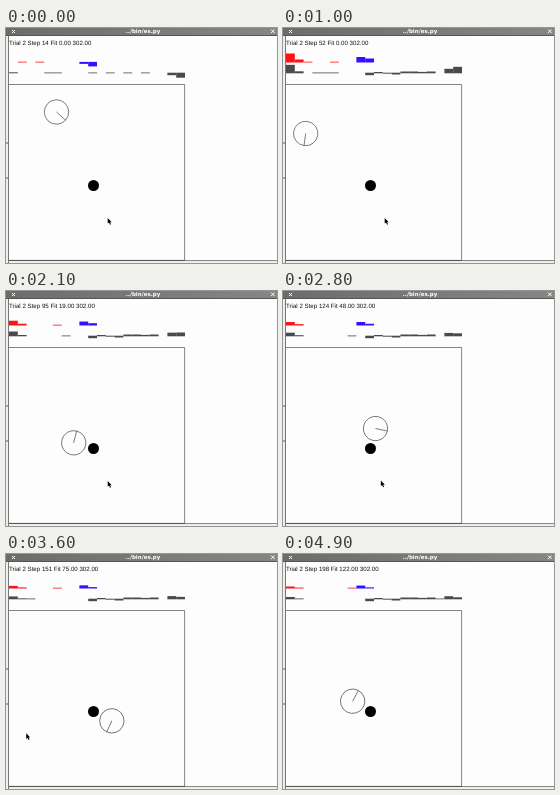
An HTML page that plays this animation: 271 by 235 pixels, repeating every 5 s.

```html
<!DOCTYPE html>
<html lang="en">
<head>
<meta charset="utf-8">
<title>Robot trial</title>
<style>
  html, body { margin: 0; width: 100%; height: 100%; overflow: hidden; background: #fdfdfd; }
  svg { display: block; width: 100vw; height: 100vh; }
  text { text-rendering: geometricPrecision; white-space: pre; }
  .title { font: bold 5.5px "DejaVu Sans", sans-serif; fill: #fff; }
  .status { font: 6.15px "Liberation Sans", Arial, sans-serif; fill: #111; }
  .line { fill: none; stroke: #222; stroke-width: .55; }
</style>
</head>
<body>
<svg viewBox="0 0 271 235">
  <defs>
    <linearGradient id="bar">
      <stop offset="0" stop-color="#6c6c6a"/>
      <stop offset="1" stop-color="#868684"/>
    </linearGradient>
  </defs>
  <rect width="271" height="235" fill="#fdfdfd"/>
  <rect y="8" width="2" height="227" fill="#eee"/>
  <path d="M0 115h2M0 150h2" stroke="#555"/>
  <rect x="2" y="8" width="1" height="227" fill="#777"/>
  <rect width="271" height="8" fill="url(#bar)"/>
  <rect y="7" width="271" height="1" fill="#555"/>
  <text class="title" x="137" y="5.3" text-anchor="middle">../bin/es.py</text>
  <path d="M6 2l3 3m0-3l-3 3M265 1.5l3.6 3.6m0-3.6l-3.6 3.6" stroke="#fff" fill="none"/>
  <rect x="3" y="233" width="268" height="2" fill="#eee"/>
  <rect x="3" y="232" width="268" height="1" fill="#888"/>
  <text class="status" id="status" x="3" y="17.3"></text>
  <g id="bars"></g>
  <path class="line" d="M3 56.5H178.6V232.4H3"/>
  <circle cx="87.5" cy="157.5" r="5.5"/>
  <g id="robot">
    <circle class="line" r="12.2"/>
    <path class="line" d="M0 0H12.2"/>
  </g>
  <path id="cursor" d="M0 0V5.6L1.3 4.5L2.3 6.8L3.3 6.3L2.3 4.2H4Z"/>
</svg>
<script>
const LOOP = 5000, TICK = 100;
const BAR_W = 8.8, BAR_X = 3, THIN = .8;
const DOT = { x: 87.5, y: 157.5 };
const ORBIT_START = 2100, ORBIT_R = 20.6, TANGENT = 88;

// time, step
const steps = [[0, 14], [1000, 52], [2100, 95], [2800, 124], [3600, 151], [4100, 169], [4900, 198]];

// time, x, y, heading
const approach = [
  [0, 50.5, 84, 42], [200, 58, 82, -45], [400, 52, 73.5, -145], [600, 39, 76, -208],
  [1000, 22.7, 105.5, -262], [1200, 26, 138, -280], [1900, 63, 159, -350], [2100, 68, 152, -438]
];

// time, angle around the dot
const orbit = [[2100, 196], [2800, 284], [3600, 387], [4100, 468], [4900, 570]];

// slot: height at start, at rest, extra kick
const inputs = { 0: [0, 1.6, 7.4], 1: [THIN, THIN, 2.2], 8: [-2, 2.8, 2.7], 9: [-4.5, 1, 3] };
const units = { 0: [1, 2, 6.5], 1: [0, THIN, 1.2], 18: [-2.5, 3, 1.5], 19: [-5, 1.8, 4.7] };
[-2.5, 1.3, -1, -1.8, 1.8, 1.8, 1.4, 1.8].forEach((rest, i) => {
  units[9 + i] = [i % 2 ? 0 : THIN, rest, 0];
});

const el = id => document.getElementById(id);
const mix = (a, b, k) => a + (b - a) * k;
const clamp = v => Math.min(1, Math.max(0, v));

function segment(rows, t) {
  const next = rows.findIndex(r => r[0] > t);
  const i = (next < 0 ? rows.length : next) - 1;
  return Math.min(i, rows.length - 2);
}

// smooth curve through the key points
function spline(rows, t, col) {
  const i = segment(rows, t), a = rows[i], b = rows[i + 1];
  const span = b[0] - a[0], k = (t - a[0]) / span;
  const slope = n => {
    const p = rows[Math.max(0, n - 1)], q = rows[Math.min(rows.length - 1, n + 1)];
    return (q[col] - p[col]) / (q[0] - p[0]) * span;
  };
  const k2 = k * k, k3 = k2 * k;
  return mix(a[col], b[col], 3 * k2 - 2 * k3)
    + slope(i) * (k3 - 2 * k2 + k) + slope(i + 1) * (k3 - k2);
}

function stepAt(t) {
  const i = segment(steps, t), [t0, a] = steps[i], [t1, b] = steps[i + 1];
  return Math.round(mix(a, b, (t - t0) / (t1 - t0)));
}

function random(seed) {
  const v = Math.sin(seed * 12.9898) * 43758.5453;
  return v - Math.floor(v);
}

function makeBars(count, base, color) {
  return Array.from({ length: count }, (_, i) => {
    const r = document.createElementNS("http://www.w3.org/2000/svg", "rect");
    r.setAttribute("x", BAR_X + i * BAR_W);
    r.setAttribute("width", BAR_W);
    r.setAttribute("fill", color(i));
    el("bars").append(r);
    return v => {
      r.setAttribute("y", v > 0 ? base - v : base - .6);
      r.setAttribute("height", Math.abs(v) < .35 ? 0 : Math.abs(v));
    };
  });
}

const inputBars = makeBars(10, 34.5, i => i < 8 ? "#f11" : "#31f");
const unitBars = makeBars(20, 45.3, () => "#4a4a4a");

function drawBars(bars, rules, t, seed) {
  const rise = clamp(t / 1000);
  const kick = rise * Math.exp(-Math.max(0, t - 1000) / 1300);
  bars.forEach((setHeight, i) => {
    const rule = rules[i];
    const flicker = random(seed + i * 7 + Math.floor(t / 400) * 31) < .3 ? THIN : 0;
    setHeight(rule ? mix(rule[0], rule[1], rise) + rule[2] * kick : flicker);
  });
}

function robotPose(t) {
  if (t < ORBIT_START) return [1, 2, 3].map(col => spline(approach, t, col));
  const angle = spline(orbit, t, 1), rad = angle * Math.PI / 180;
  return [DOT.x + ORBIT_R * Math.cos(rad), DOT.y + ORBIT_R * Math.sin(rad), angle + TANGENT];
}

function draw(t) {
  const step = stepAt(t);
  const fit = Math.max(0, step - 76).toFixed(2);
  el("status").textContent = `Trial 2 Step ${step} Fit ${fit} 302.00`;
  drawBars(inputBars, inputs, t, 3);
  drawBars(unitBars, units, t, 101);
  const [x, y, heading] = robotPose(t);
  el("robot").setAttribute("transform", `translate(${x} ${y}) rotate(${heading})`);
  const k = clamp((t - 2700) / 400) ** 2.2;
  el("cursor").setAttribute("transform", `translate(${mix(101.7, 20.2, k)} ${mix(190, 179.3, k)})`);
  el("cursor").style.display = t < 3700 ? "" : "none";
}

const start = performance.now();
function loop() {
  const t = (performance.now() - start) % LOOP;
  draw(Math.floor(t / TICK) * TICK);
  requestAnimationFrame(loop);
}
loop();
</script>
</body>
</html>
```
